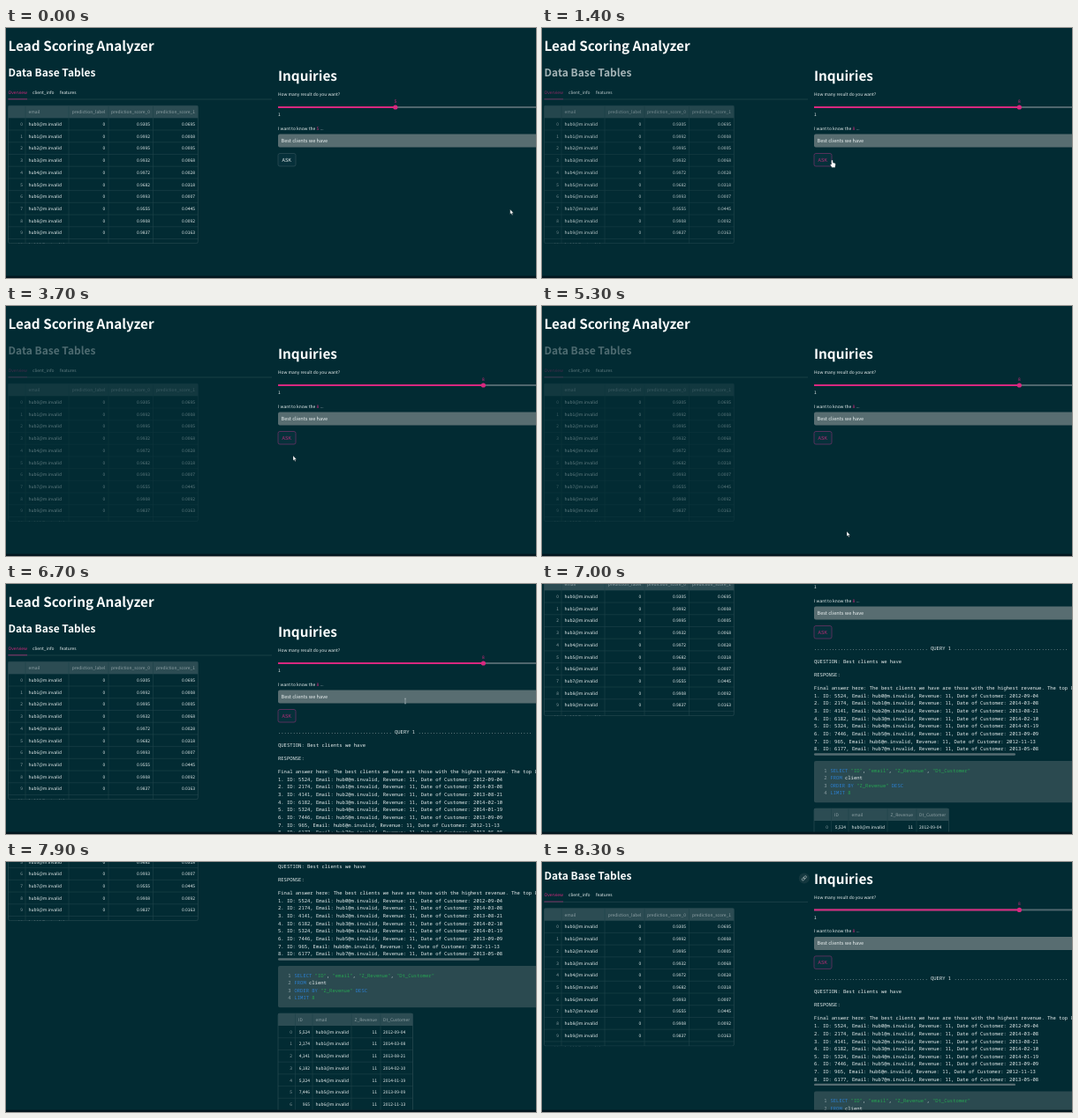
An HTML page for the animation above (8.4 s loop, 600 px wide and 284 px high).

```html
<!DOCTYPE html>
<html lang="en">
<head>
<meta charset="utf-8">
<title>Lead Scoring Analyzer</title>
<style>
  html, body { margin: 0; width: 100%; height: 100%; overflow: hidden; background: #022b33; }
  svg { display: block; width: 600px; height: 284px; }
  text {
    font-family: "Noto Sans CJK JP", "Noto Sans CJK SC", "Noto Sans CJK KR", Lato, sans-serif;
    text-rendering: geometricPrecision; white-space: pre; fill: #eaf0f0;
  }
  text.mono { font-family: "Noto Sans Mono", "DejaVu Sans Mono", monospace; }
  .bold { font-weight: 700; fill: #fbfdfd; }
  .pink { fill: #d8287f; }
  .dim { fill: #8fa1a5; }
  .key { fill: #2b7fd0; }
  .str { fill: #27a552; }
</style>
</head>
<body>
<svg id="stage" viewBox="0 0 600 284"></svg>
<script>
const NS = 'http://www.w3.org/2000/svg';
const LOOP = 8400, STEP = 100;
const SMALL = 5.5, FIELD = 6.3, H1 = 17.1, H2 = 13.4;
const ROW = 13.72, LINE = 8.65, PINK = '#d8287f', GRID = '#1f434a';
const SLIDER_X = 308, NOTCH = 33.2;

function el(parent, tag, attrs = {}, content) {
  const node = document.createElementNS(NS, tag);
  for (const k in attrs) node.setAttribute(k, attrs[k]);
  if (content !== undefined) node.textContent = content;
  parent.appendChild(node);
  return node;
}
const group = (parent, attrs) => el(parent, 'g', attrs);
const rect = (parent, x, y, width, height, fill, more = {}) =>
  el(parent, 'rect', { x, y, width, height, fill, ...more });
const path = (parent, d, stroke, width = 0.6, fill = 'none') =>
  el(parent, 'path', { d, stroke, fill, 'stroke-width': width });

// Text centred on height cy; the sans face runs large, so its size is reduced.
function label(parent, x, cy, str, { size = SMALL, cls = '', end = false } = {}) {
  return el(parent, 'text', {
    x, y: cy + size * 0.33, class: cls,
    'font-size': cls.includes('mono') ? size : size * 0.895,
    'text-anchor': end ? 'end' : 'start'
  }, str);
}
const mono = (parent, x, cy, str, cls = '') => label(parent, x, cy, str, { cls: 'mono ' + cls });
const mail = i => `hub${i}@m.invalid`;

// cols: [text x, right aligned, heading]; the first column is the row index.
function table(parent, { y, bottom, edges, cols, rows }) {
  const x0 = edges[0], x1 = edges[edges.length - 1], top = y + 14;
  rect(parent, x0, y, x1 - x0, 14, '#2c4c53');
  cols.forEach(([x, end, name, headEnd = end]) =>
    label(parent, x, y + 7.2, name, { cls: 'dim', end: headEnd }));
  rows.forEach((cells, r) => {
    const cy = top + ROW * (r + 0.5);
    cells.forEach((cell, c) =>
      label(parent, cols[c][0], cy, cell, { end: cols[c][1], cls: c ? '' : 'dim' }));
    const ly = top + ROW * (r + 1);
    if (ly < bottom - 1) path(parent, `M${x0} ${ly}H${x1}`, GRID);
  });
  edges.slice(1, -1).forEach(x => path(parent, `M${x} ${y}V${bottom}`, GRID));
  rect(parent, x0, y, x1 - x0, bottom - y, 'none', { rx: 2, stroke: '#2a4b52', 'stroke-width': 0.7 });
}

const svg = document.getElementById('stage');
rect(svg, 0, 0, 600, 284, '#022b33');
const page = group(svg);

// Left column
label(page, 2.5, 20, 'Lead Scoring Analyzer', { size: H1, cls: 'bold' });
const heading = group(page), grid = group(page);
label(heading, 2.5, 51, 'Data Base Tables', { size: H2, cls: 'bold' });
label(heading, 2.5, 73, 'Overview', { cls: 'pink' });
path(page, 'M2.5 81H301', '#24484f', 0.7);
path(heading, 'M2.5 80.8H24', PINK, 0.9);
label(grid, 30, 73, 'client_info');
label(grid, 61, 73, 'features');

const clip = el(svg, 'clipPath', { id: 'crop' });
rect(clip, 0, 85, 303, 159.9);
const scores = [695, 8, 5, 68, 28, 318, 7, 445, 92, 163];
const leadRows = scores.map((s, i) =>
  [i, mail(i), 0, (1 - s / 1e4).toFixed(4), (s / 1e4).toFixed(4)]);
leadRows.push([10, mail(10)]);
table(group(grid, { 'clip-path': 'url(#crop)' }), {
  y: 88.3, bottom: 244.7, edges: [2.5, 22, 71, 116, 166.5, 217.3],
  cols: [[19, true, ''], [25.5, false, 'email'], [112.3, true, 'prediction_label'],
         [163, true, 'prediction_score_0'], [214, true, 'prediction_score_1']],
  rows: leadRows
});

const anchor = group(page, { transform: 'translate(296.8 54)' });
el(anchor, 'circle', { r: 6, fill: '#14383f' });
const links = group(anchor, { transform: 'rotate(-45)', fill: 'none', stroke: '#a8b6b8', 'stroke-width': 0.7 });
for (const x of [-3.2, -0.4]) rect(links, x, -1.2, 3.6, 2.4, 'none', { rx: 1.2 });

// Right column
label(page, 308, 54.5, 'Inquiries', { size: H1, cls: 'bold' });
label(page, 308, 75.5, 'How many result do you want?');
rect(page, SLIDER_X, 89, 300, 2, '#50676e');
const fill = rect(page, SLIDER_X, 89, 0, 2, PINK);
const thumb = el(page, 'circle', { cy: 90, r: 2.6, fill: PINK });
const value = label(page, 0, 83, '', { cls: 'pink' });
value.setAttribute('text-anchor', 'middle');
label(page, 308, 98.5, '1');
label(page, 308, 114, 'I want to know the');
const count = label(page, 351.5, 114, '', { cls: 'pink' });
label(page, 355.5, 114, '...');
rect(page, 308, 120.5, 300, 15, '#586d71', { rx: 2 });
label(page, 311.5, 128, 'Best clients we have', { size: FIELD });
const button = rect(page, 308, 142.5, 20, 14.5, '#06303a', { rx: 2, 'stroke-width': 0.7 });
const ask = label(page, 312.6, 149.8, 'ASK', { size: FIELD });

// Query result
const result = group(page);
const dots = '.'.repeat(39);
mono(result, 308, 168, `${dots} QUERY 1 ${dots}`);
mono(result, 308, 183, 'QUESTION: Best clients we have');
mono(result, 308, 198, 'RESPONSE:');
mono(result, 308, 213.2, 'Final answer here: The best clients we have are those with the highest revenue. The top 8 clients are:');
const clients = [
  [5524, '2012-09-04'], [2174, '2014-03-08'], [4141, '2013-08-21'], [6182, '2014-02-10'],
  [5324, '2014-01-19'], [7446, '2013-09-09'], [965, '2012-11-13'], [6177, '2013-05-08']
];
clients.forEach(([id, date], i) => mono(result, 308, 222 + LINE * i,
  `${i + 1}. ID: ${id}, Email: ${mail(i)}, Revenue: 11, Date of Customer: ${date}`));
rect(result, 308, 287.3, 228, 2.4, '#566c71', { rx: 1.2 });

rect(result, 308, 296, 300, 47.3, '#2b4a50', { rx: 2 });
const sql = [
  [['key', 'SELECT '], ['str', '"ID"'], ['', ', '], ['str', '"email"'], ['', ', '],
   ['str', '"Z_Revenue"'], ['', ', '], ['str', '"Dt_Customer"']],
  [['key', 'FROM '], ['', 'client']],
  [['key', 'ORDER BY '], ['str', '"Z_Revenue"'], ['key', ' DESC']],
  [['key', 'LIMIT '], ['str', '8']]
];
sql.forEach((parts, i) => {
  const cy = 306.7 + LINE * i;
  mono(result, 319.2, cy, i + 1, 'dim');
  const line = mono(result, 326.5, cy, '');
  parts.forEach(([cls, str]) => el(line, 'tspan', { class: cls }, str));
});
table(result, {
  y: 350, bottom: 474, edges: [308, 327.5, 347, 391, 424, 460.5],
  cols: [[324, true, ''], [344, true, ''], [350.5, false, 'email'],
         [420, true, 'Z_Revenue'], [427, false, 'Dt_Customer']],
  rows: clients.map(([id, date], i) => [i, id.toLocaleString('en-US'), mail(i), 11, date])
});
label(result, 331, 357.2, 'ID', { cls: 'dim' });

rect(svg, 0, 281.6, 600, 2.4, '#03171f');

// Pointers
const cursor = group(svg);
const pointers = {
  arrow: path(cursor, 'M0 0V5.6L1.3 4.5L2.2 6.6L3.1 6.2L2.2 4.2H3.9Z', '#0a1a1e', 0.3, '#fff'),
  hand: path(cursor, 'M-1 .6Q0 -.8 .8 .6L1 3L3 3.5Q4 3.9 3.8 5.2L3.3 8.4H-.4L-2.2 5.2Q-2 4.2 -.8 5Z', '#0a1a1e', 0.3, '#fff'),
  beam: path(cursor, 'M-1 -2.8H1M0 -2.8V2.8M-1 2.8H1', '#b4c2c4', 0.6)
};

// Motion tables: [time, ...values]
const mouse = [
  [0, 570.7, 206], [400, 442, 90], [500, 442, 90], [900, 542, 90], [1000, 540, 92],
  [1300, 328.5, 150], [2000, 328.5, 150], [2700, 325, 170], [4300, 325, 170],
  [5000, 338, 250], [5600, 352, 262], [6100, 380, 255], [6200, 380, 255],
  [6300, 415, 205], [6600, 452, 133]
];
const headFade = [[900, 1], [1900, 0.3], [6200, 0.3], [6300, 1]];
const gridFade = [[1000, 1], [1400, 0.82], [2000, 0.4], [6200, 0.4], [6300, 1]];
const scroll = [[6700, 0], [6800, 22], [7000, 95], [7300, 232], [7400, 249.2], [7700, 249.2], [8300, 35.6]];

function at(keys, t) {
  const i = keys.findIndex(k => k[0] > t);
  if (i === 0) return keys[0].slice(1);
  if (i < 0) return keys[keys.length - 1].slice(1);
  const a = keys[i - 1], b = keys[i], u = (t - a[0]) / (b[0] - a[0]);
  return a.slice(1).map((v, j) => v + (b[j + 1] - v) * u);
}
const show = (node, on) => node.setAttribute('visibility', on ? 'visible' : 'hidden');

function draw(t) {
  const [mx, my] = at(mouse, t);
  const n = t < 500 ? 5 : t >= 900 ? 8 : Math.round(1 + (mx - SLIDER_X) / NOTCH);
  const x = SLIDER_X + NOTCH * (n - 1);
  fill.setAttribute('width', x - SLIDER_X);
  thumb.setAttribute('cx', x);
  value.setAttribute('x', x);
  value.textContent = count.textContent = n;

  const active = t >= 1300;
  button.setAttribute('stroke', active ? '#78336a' : '#2f5058');
  ask.style.fill = active ? '#b92d77' : '';

  heading.setAttribute('opacity', at(headFade, t)[0]);
  grid.setAttribute('opacity', at(gridFade, t)[0]);
  show(result, t >= 6300);
  show(anchor, t >= 8200);
  page.setAttribute('transform', `translate(0 ${-at(scroll, t)[0]})`);

  const overSlider = t >= 400 && t < 1000, overButton = t >= 1300 && my < 157 && t < 2400;
  const kind = t >= 6800 ? '' : t >= 6600 ? 'beam' : overSlider || overButton ? 'hand' : 'arrow';
  for (const k in pointers) show(pointers[k], k === kind);
  cursor.setAttribute('transform', `translate(${mx} ${my})`);
}

const start = performance.now();
function tick() {
  const t = (performance.now() - start) % LOOP;
  draw(Math.floor(t / STEP) * STEP);
  requestAnimationFrame(tick);
}
draw(0);
requestAnimationFrame(tick);
</script>
</body>
</html>
```
